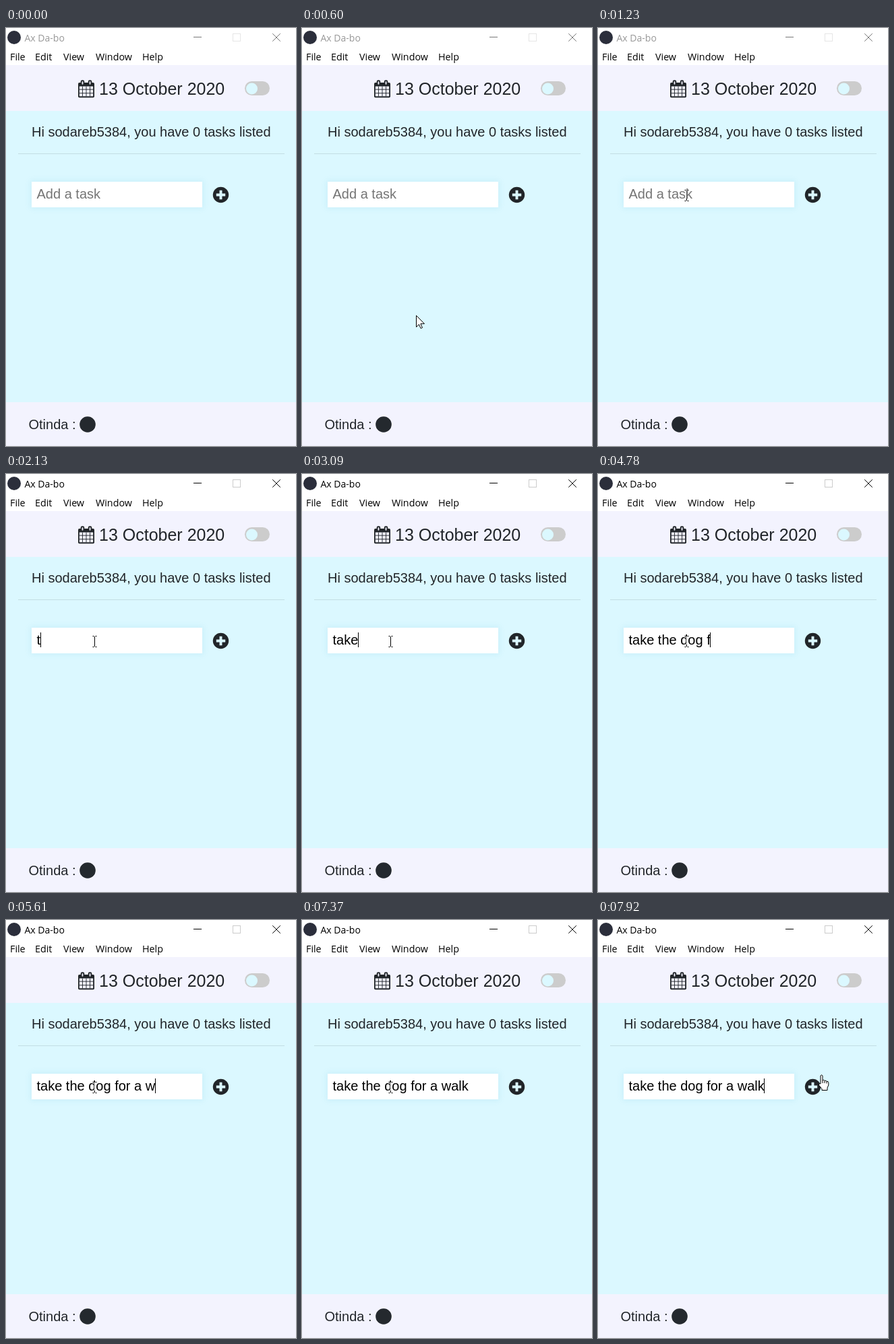
An HTML page that plays this animation: 430 px wide and 620 px high, repeating every 8 s.

```html
<!DOCTYPE html>
<html lang="en">
<head>
<meta charset="utf-8">
<title>To-do list</title>
<style>
  html, body { margin: 0; width: 100%; height: 100%; overflow: hidden; background: #fff; }
  svg { display: block; }
  text { font-family: "Liberation Sans", Arial, sans-serif; font-size: 20px; fill: #212529; white-space: pre; }
  .ui text { font-family: "Open Sans", "Noto Sans", sans-serif; font-size: 14.3px; fill: #000; }
  #ibeam { mix-blend-mode: difference; }
</style>
</head>
<body>
<svg width="430" height="620" viewBox="0 0 430 620">
  <defs>
    <filter id="blur" x="-10%" y="-50%" width="120%" height="200%"><feGaussianBlur stdDeviation="4"/></filter>
  </defs>
  <rect width="430" height="620" fill="#fff"/>

  <g class="ui">
    <circle cx="12" cy="14" r="10" fill="#2b2e3b"/>
    <text id="title" x="27.5" y="19.5" style="font-size:14px">Ax Da-bo</text>
    <g fill="none">
      <path id="buttons" d="M278 13.5H290M395.2 8.2L406.8 19.8M406.8 8.2L395.2 19.8"/>
      <rect id="maximise" x="336.5" y="8.5" width="11" height="11"/>
    </g>
    <text x="6" y="48">File</text>
    <text x="43" y="48">Edit</text>
    <text x="85" y="48">View</text>
    <text x="133" y="48">Window</text>
    <text x="202" y="48">Help</text>
  </g>

  <rect y="55" width="430" height="68" fill="#f3f3fe"/>
  <rect y="123" width="430" height="432" fill="#dbf8ff"/>
  <rect y="555" width="430" height="65" fill="#f3f3fe"/>

  <g transform="translate(107 77.3) scale(.01442)" fill="#212529">
    <rect y="256" width="1664" height="1536" rx="128"/>
    <rect x="256" width="384" height="576" rx="160"/>
    <rect x="1024" width="384" height="576" rx="160"/>
    <g fill="#f3f3fe">
      <rect x="384" y="128" width="128" height="320" rx="32"/>
      <rect x="1152" y="128" width="128" height="320" rx="32"/>
      <rect x="128" y="640" width="1408" height="1024"/>
    </g>
    <path d="M448 640V1664M832 640V1664M1216 640V1664M128 960H1536M128 1344H1536" stroke="#212529" stroke-width="64"/>
  </g>
  <text x="138" y="99" style="font-size:25px">13 October 2020</text>
  <rect x="354" y="79" width="37" height="21" rx="10.5" fill="#ccc"/>
  <circle cx="364.5" cy="90" r="8.5" fill="#dbf8ff"/>

  <text x="215.3" y="161" text-anchor="middle">Hi sodareb5384, you have 0 tasks listed</text>
  <path d="M18 186.5H413" stroke="#000" stroke-opacity=".11"/>

  <rect x="36" y="226" width="257" height="42" fill="#5cb8d8" opacity=".13" filter="url(#blur)"/>
  <rect x="38" y="228" width="253" height="38" fill="#fff"/>
  <text id="entry" x="45.5" y="253"></text>
  <rect id="caret" y="235" width="1" height="22"/>

  <circle cx="318.5" cy="247.5" r="11.7" fill="#212529"/>
  <path d="M311.8 247.5H325.2M318.5 240.8V254.2" stroke="#dbf8ff" stroke-width="3.9"/>

  <text x="33.5" y="595">Otinda : </text>
  <circle cx="121" cy="588" r="11.8" fill="#24292e"/>

  <g id="ibeam" fill="none" stroke="#fff">
    <path d="M-3 -8.5H-1M1 -8.5H3M-3 7.5H-1M1 7.5H3M0 -8V7"/>
  </g>
  <path id="arrow" d="M0 0V17L4 13.2 6.6 19 9 18 6.4 12.2H12Z" fill="#fff" stroke="#000"/>
  <g id="hand" stroke="#000" stroke-linejoin="round">
    <path d="M-1.5 13.5V1.5Q0 -1 1.5 1.5V8.5Q3.5 6.5 4.5 9 6.5 7.5 7.5 10 10 9 10.3 12V15.5L8.5 19.5V23H.5V21L-4 15.5Q-4.5 12.5 -2.5 13.2Z" fill="#fff"/>
    <path d="M1.5 8.5V12.5M4.5 9V12.5M7.5 10V13" fill="none"/>
  </g>
</svg>
<script>
const LOOP = 8000, FOCUS = 1420, BLINK = 530;
const TASK = "take the dog for a walk";
const KEY_TIMES = [
  2130, 2560, 2720, 3090, 3240, 3400, 3550, 3720, 3880, 4070, 4230, 4380,
  4520, 4670, 4820, 4970, 5110, 5260, 5410, 5610, 6500, 6700, 6900
];
const ENTER = { start: 210, end: 1230, steps: 13, curve: [[332, 600], [150, 430], [-60, 150], [131, 249]] };
const LEAVE = { start: 7395, end: 7920, steps: 7, curve: [[131, 249], [330, 290], [490, 150], [331, 229]] };

const $ = id => document.getElementById(id);
const [title, buttons, maximise, entry, caret] =
  ["title", "buttons", "maximise", "entry", "caret"].map($);
const pointers = ["ibeam", "arrow", "hand"].map($);
const show = (el, on) => el.setAttribute("visibility", on ? "visible" : "hidden");

function bezier([a, b, c, d], p) {
  const q = 1 - p;
  return [0, 1].map(i => q * q * q * a[i] + 3 * q * q * p * b[i] + 3 * q * p * p * c[i] + p * p * p * d[i]);
}

function pointerAt(t) {
  const { start, end, steps, curve } = t < LEAVE.start ? ENTER : LEAVE;
  const p = Math.min(1, (t - start) / (end - start));
  return bezier(curve, Math.floor(p * steps + 1e-6) / steps).map(Math.round);
}

const within = (x, y, left, top, right, bottom) => x >= left && x <= right && y >= top && y <= bottom;

function pointerKind(x, y) {
  if (within(x, y, 38, 228, 291, 266)) return "ibeam";
  return within(x, y, 305, 225, 333, 262) ? "hand" : "arrow";
}

function drawPointer(t) {
  const [x, y] = pointerAt(t), kind = pointerKind(x, y);
  for (const el of pointers) {
    show(el, t >= ENTER.start && el.id === kind);
    el.setAttribute("transform", `translate(${x + 0.5} ${y + (kind === "ibeam" ? 0 : 0.5)})`);
  }
}

function drawEntry(t) {
  const count = KEY_TIMES.filter(k => k <= t).length;
  const typed = TASK.slice(0, count);
  entry.textContent = typed || "Add a task";
  entry.style.fill = typed ? "#000" : "#757575";

  // The blink restarts at a key press, shortly before its letter appears.
  const restart = count ? KEY_TIMES[count - 1] - 65 : FOCUS;
  const off = Math.floor((t - restart) / BLINK) % 2 === 1;
  const width = typed ? entry.getComputedTextLength() : 0;
  caret.setAttribute("x", Math.floor(45.5 + width));
  show(caret, t >= FOCUS && !off);
}

function drawTitleBar(t) {
  const focused = t >= FOCUS;
  title.style.fill = focused ? "#000" : "#999";
  buttons.setAttribute("stroke", focused ? "#000" : "#777");
  maximise.setAttribute("stroke", focused ? "#ccc" : "#e6e6e6");
}

function render(t) {
  drawTitleBar(t);
  drawEntry(t);
  drawPointer(t);
}

const origin = performance.now();
function frame() {
  render((performance.now() - origin) % LOOP);
  requestAnimationFrame(frame);
}
frame();
</script>
</body>
</html>
```
